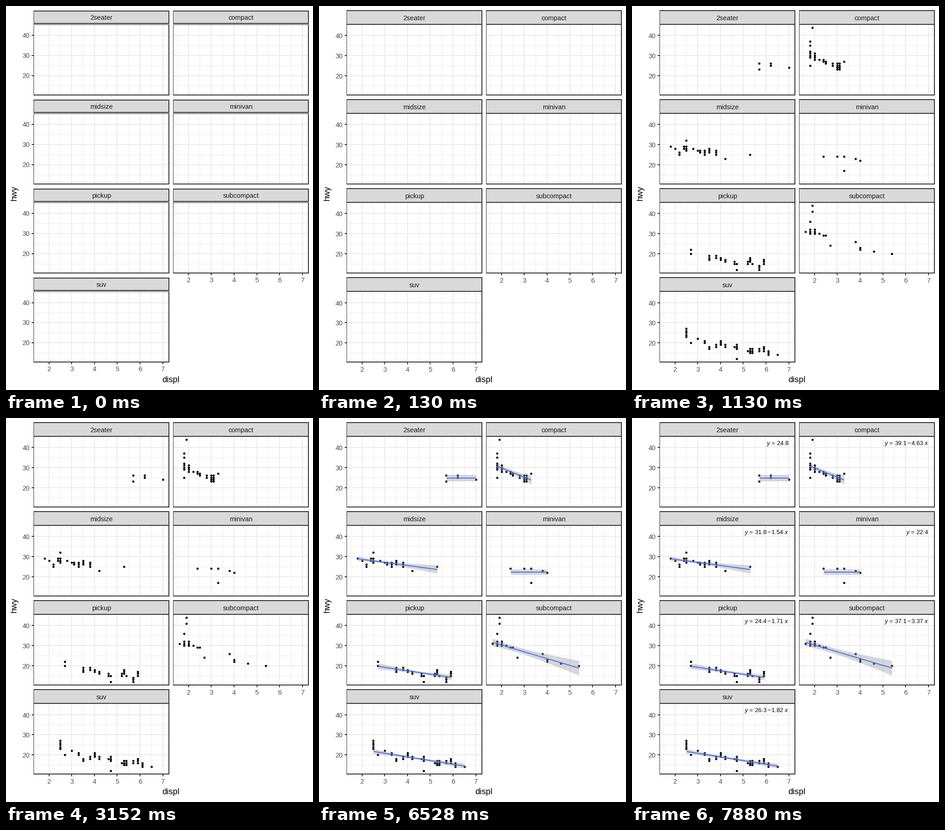
A matplotlib script for the animation above (8000 ms loop, 669 by 837 pixels).

```python
import math

import matplotlib.pyplot as plt
import numpy as np
from matplotlib.animation import FuncAnimation
from matplotlib.collections import LineCollection, PolyCollection

W, H, DPI = 669, 837, 64
LOOP, STEP = 8000, 20
INTRO_END, DOTS_AT, FIT_AT, EQ_AT = 130, 1130, 4500, 7880

GRID, INK, STRIP = "#EBEBEB", "#333333", "#D9D9D9"
TICK_TEXT, STRIP_TEXT, BLUE = "#4D4D4D", "#1A1A1A", "#3366FF"
ROW_STEP, COL_STEP = 194.15, 304.12
X_RANGE, Y_RANGE = (1.33, 7.27), (10.4, 45.6)
ENGINES = (1.6, 1.8, 2, 2.2, 2.4, 2.5, 2.8, 3, 3.1, 3.3, 3.5, 3.8, 4,
           4.2, 4.6, 4.7, 5.2, 5.3, 5.4, 5.7, 5.9, 6.1, 6.5)

plt.rcParams.update({
    "font.family": "Liberation Sans",
    "mathtext.fontset": "custom",
    "mathtext.rm": "Liberation Sans",
    "mathtext.it": "Liberation Sans:italic",
    "mathtext.bf": "Liberation Sans:bold",
    "mathtext.cal": "Liberation Sans",
    "mathtext.tt": "Liberation Mono",
})

fig = plt.figure(figsize=(W / DPI, H / DPI), dpi=DPI, facecolor="white")
ax = fig.add_axes([0, 0, 1, 1])
ax.set_xlim(0, W)
ax.set_ylim(H, 0)
ax.axis("off")

grid, ink = [], []                  # rectangles shown all the time
intro_fill, intro_ink = [], []      # strips of the opening picture
strip_fill, strip_ink = [], []      # strips afterwards
dots, bands, fits = [], [], []
shifting, equations = [], []        # texts that nudge, texts that appear late


def px(displ, col):
    return 60.75 + COL_STEP * col + (displ - X_RANGE[0]) * 49.65


def py(hwy, row):
    return 40.07 + ROW_STEP * row + (Y_RANGE[1] - hwy) * 4.375


def rect(layer, x0, y0, x1, y1):
    layer.append([(x0, y0), (x1, y0), (x1, y1), (x0, y1)])


def text(x, y, s, size, color, ha="center", va="baseline", **kw):
    return ax.text(x, y, s, fontsize=size * 72 / DPI, color=color, ha=ha,
                   va=va, **kw)


def nudged(x, y, s, color, ha="center"):
    shifting.append((text(x, y, s, 14.5, color, ha), y))


def add_grid(col, row, left, right, top, bottom):
    for d in np.arange(1.5, 7.1, 0.5):
        x = int(px(d, col))
        rect(grid, x - (d % 1 == 0), top, x + 1, bottom)
    for h in range(15, 46, 5):
        y = int(py(h, row))
        rect(grid, left, y - (h % 10 == 0), right, y + 1)


def add_frame(col, row, label):
    left, right = (int(px(d, col)) for d in X_RANGE)
    bottom, top = (int(py(h, row)) for h in Y_RANGE)
    right, bottom = right + 1, bottom + 1
    head = int(9.17 + ROW_STEP * row)
    add_grid(col, row, left, right, top, bottom)

    rect(ink, left, top, left + 1, bottom)
    rect(ink, right - 2, top, right, bottom)
    rect(ink, left, bottom - 2, right, bottom)
    rect(ink, left, top, right, top + 1)

    for fill, edge, y0, y1 in ((intro_fill, intro_ink, head + 1, top - 1),
                               (strip_fill, strip_ink, head, top + 1)):
        rect(fill, left, y0, right, y1)
        rect(edge, left, y0, right, y0 + 2)
        rect(edge, left, y1 - 2, right, y1)
        rect(edge, left, y0, left + 1, y1)
        rect(edge, right - 2, y0, right, y1)

    nudged((left + right) / 2, head + 22, label, STRIP_TEXT)
    return left, bottom


def add_ticks(col, row, left, bottom):
    if col == 0:
        for h in (20, 30, 40):
            y = int(py(h, row))
            rect(ink, left - 4, y - 1, left, y + 1)
            nudged(52, y + 6, str(h), TICK_TEXT, "right")
    if row + col == 3:
        for d in range(2, 8):
            x = int(px(d, col))
            rect(ink, x - 1, bottom, x + 1, bottom + 4)
            nudged(px(d, col) - 0.5, bottom + 20, str(d), TICK_TEXT)


def scatter(seed, base, slope, spans, tall):
    """Short vertical runs of dots near the line, one per engine size."""
    rng = np.random.default_rng(seed)
    points = set()
    for d in ENGINES:
        if any(lo <= d <= hi for lo, hi in spans):
            mid = round(base - slope * d + rng.normal(0, 0.8))
            count = int(rng.integers(1, tall + 1))
            points |= {(d, mid + i - count // 2) for i in range(count)}
    return points


def add_dots(col, row, points):
    turn = np.arange(24) * math.pi / 12
    disc = 2.4 * np.column_stack([np.cos(turn), np.sin(turn)])
    for d, h in points:
        dots.append(disc + (int(px(d, col)) + 0.5, int(py(h, row)) + 0.5))


def add_fit(col, row, x0, x1, base, slope, spread):
    """Straight fit with a hyperbolic confidence band."""
    near, far, mean = spread
    d = np.linspace(x0, x1, 80)
    mid = base - slope * d
    half = np.hypot(near, far * (d - mean))
    x = px(d, col)
    upper = np.column_stack([x, py(mid + half, row)])
    lower = np.column_stack([x, py(mid - half, row)])
    bands.append(np.vstack([upper, lower[::-1]]))
    fits.append(np.column_stack([x, py(mid, row)]))

    label = f"$y$ = {base:.1f}"
    if slope:
        label += rf"$\,$−$\,${slope:.2f} $x$"
    equations.append(text(px(7, col) - 0.5, round(59 + ROW_STEP * row), label,
                          13, "black", "right", zorder=5))


def panel(index, label, base, slope, spread, keys, spans=(), tall=3):
    row, col = divmod(index, 2)
    left, bottom = add_frame(col, row, label)
    add_ticks(col, row, left, bottom)
    points = scatter(index, base, slope, spans, tall) | set(keys)
    add_dots(col, row, points)
    sizes = [d for d, _ in points]
    add_fit(col, row, min(sizes), max(sizes), base, slope, spread)


panel(0, "2seater", 24.8, 0, (1.62, 0, 0),
      [(5.7, 23), (5.7, 26), (6.2, 25), (6.2, 26), (7, 24)])
panel(1, "compact", 39.1, 4.63, (0.937, 2.095, 2.33),
      [(1.9, 44), (1.8, 37), (1.8, 35), (1.8, 25), (3.3, 27)],
      [(1.8, 3.1)], tall=4)
panel(2, "midsize", 31.8, 1.54, (0.585, 0.823, 2.92),
      [(2.5, 32), (4.2, 23), (5.3, 25)], [(1.8, 3.8)])
panel(3, "minivan", 22.4, 0, (1.385, 0, 0),
      [(2.4, 24), (3, 24), (3.3, 17), (3.3, 24)], [(3.3, 3.3), (3.8, 4)])
panel(4, "pickup", 24.4, 1.71, (0.64, 0.78, 4.42),
      [(2.7, 22), (2.7, 20), (4.7, 12)], [(3.4, 5.9)])
panel(5, "subcompact", 37.1, 3.37, (1.352, 1.248, 2.66),
      [(1.9, 44), (1.9, 41), (1.8, 36), (2.7, 24), (5.4, 20)],
      [(1.6, 2.5), (3.8, 4), (4.6, 4.6)])
panel(6, "suv", 26.3, 1.82, (0.577, 0.543, 4.46),
      [(2.5, h) for h in range(23, 28)] + [(2.7, 20), (3, 22), (4.7, 12)],
      [(3.3, 6.5)])

text(359.5, 820, "displ", 18.33, "black")
text(18, 407.5, "hwy", 18.33, "black", va="center", rotation=90)


def shapes(polys, color, z, alpha=None, smooth=False):
    return ax.add_collection(
        PolyCollection(polys, facecolors=color, linewidths=0, alpha=alpha,
                       antialiaseds=smooth, zorder=z), autolim=False)


shapes(grid, GRID, 1)
shapes(ink, INK, 4.5)
dot_art = shapes(dots, "black", 2, smooth=True)
band_art = shapes(bands, "#999999", 3, alpha=0.4, smooth=True)
fit_art = ax.add_collection(
    LineCollection(fits, colors=BLUE, linewidths=1.8 * 72 / DPI,
                   capstyle="butt", zorder=4), autolim=False)
intro_art = [shapes(intro_fill, STRIP, 4.6), shapes(intro_ink, INK, 4.7)]
strip_art = [shapes(strip_fill, STRIP, 4.6), shapes(strip_ink, INK, 4.7)]
for title, _ in shifting:
    title.set_zorder(5)


def show(artists, on):
    for artist in artists:
        artist.set_visible(on)


def update(n):
    t = (n + 1) * STEP - 1
    intro = t < INTRO_END
    show(intro_art, intro)
    show(strip_art, not intro)
    for label, y in shifting:
        label.set_y(y - intro)
    show([dot_art], t >= DOTS_AT)
    show([band_art, fit_art], t >= FIT_AT)
    show(equations, t >= EQ_AT)
    return []


anim = FuncAnimation(fig, update, frames=LOOP // STEP, init_func=lambda: [],
                     interval=STEP, repeat=True, repeat_delay=0, blit=False)
plt.show()
```
